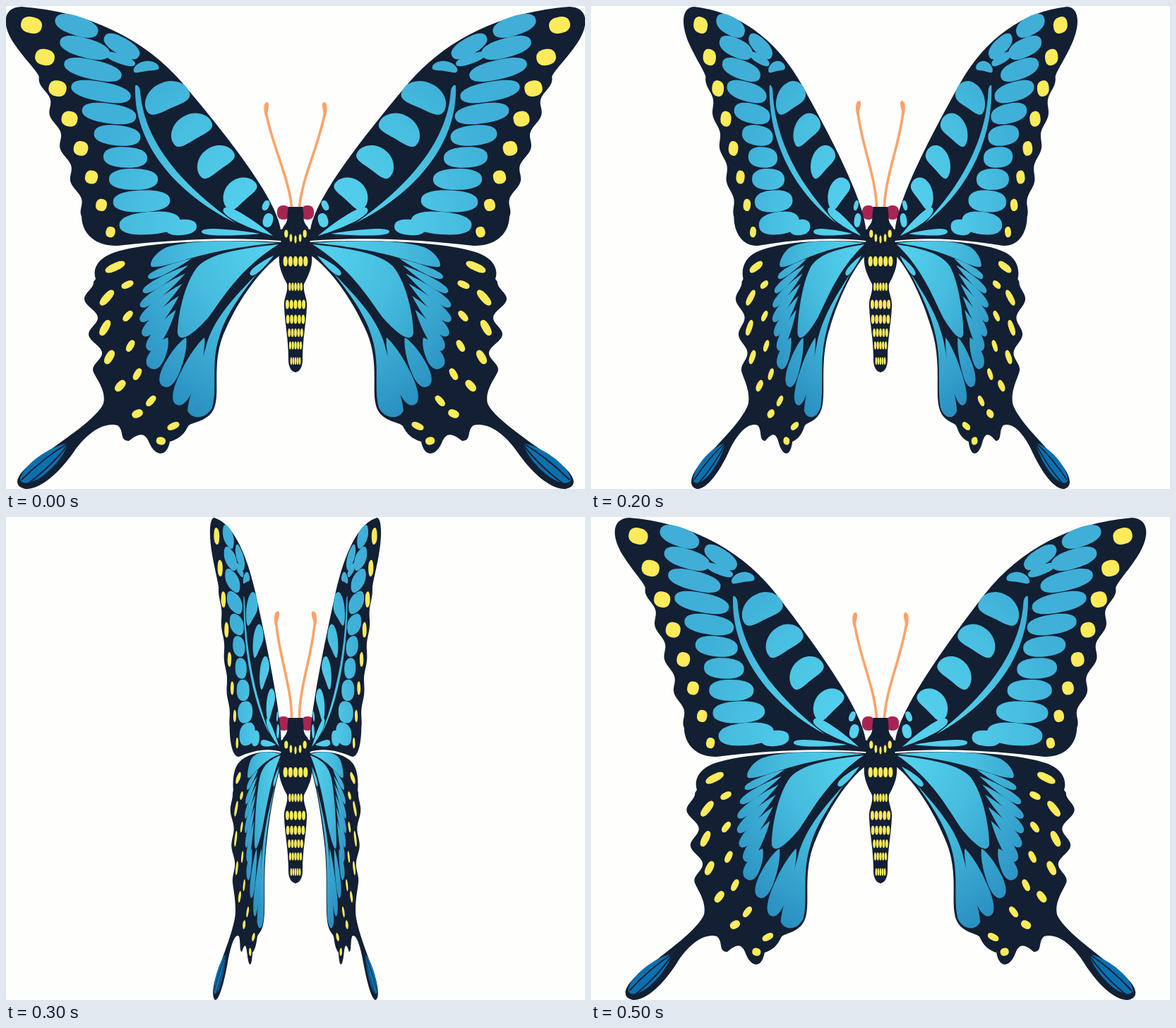
Write an HTML page that moves like this. It is 820 by 683 pixels and loops after 0.6 s.

```html
<!DOCTYPE html>
<html lang="en">
<head>
<meta charset="utf-8">
<title>Butterfly</title>
<style>
html, body { margin: 0; height: 100%; overflow: hidden; background: #fefefc; }
svg { display: block; width: 100%; height: 100%; }
.dark { fill: #131f33; }
.yellow { fill: #fdeb5b; }
</style>
</head>
<body>
<svg viewBox="0 0 820 683">
  <defs>
    <radialGradient id="foreBlue" gradientUnits="userSpaceOnUse" cx="390" cy="330" r="440">
      <stop offset="0" stop-color="#57d6f2"/>
      <stop offset=".35" stop-color="#4dc6e6"/>
      <stop offset=".65" stop-color="#3fb0d8"/>
      <stop offset="1" stop-color="#40aed7"/>
    </radialGradient>
    <radialGradient id="hindBlue" gradientUnits="userSpaceOnUse" cx="390" cy="335" r="290">
      <stop offset="0" stop-color="#56d5f0"/>
      <stop offset=".45" stop-color="#46bcde"/>
      <stop offset="1" stop-color="#268abd"/>
    </radialGradient>
  </defs>
  <g id="half">
    <g id="antenna" fill="#fba26a">
      <path d="M404.500 284C400 240 376 195 368.500 151" fill="none" stroke="#fba26a" stroke-width="3.600"/>
      <path d="M367 156C364 144 365 136 370 136C374 138 371 146 370 154Z"/>
    </g>
    <rect x="384" y="282" width="18" height="20" rx="8" fill="#a82552"/>
    <g id="wing">
      <g id="hind" fill="url(#hindBlue)"></g>
      <path d="M89 618C62 622 22 650 20 670C28 686 72 658 89 618Z" fill="#0b70ae"/>
      <path d="M90 617Q54 638 22 670M90 617Q68 648 29 677" fill="none" stroke="#131f33" stroke-width="2"/>
      <g id="fore" fill="url(#foreBlue)"></g>
      <g id="spots" class="yellow"></g>
    </g>
    <path class="dark" d="M411 284H400C397 300 401 303 393 312C387 322 391 335 388 345C384 365 390 378 398 393C400 405 393 412 394 425C395 450 400 470 400 500C400 512 405 518 411 518Z"/>
  </g>
  <use href="#half" transform="translate(820) scale(-1 1)"/>
  <g id="bands" class="yellow"></g>
</svg>
<script>
const el = id => document.getElementById(id);
const power = (v, p) => Math.sign(v) * Math.abs(v) ** p;

function path(id, d, name = "") {
  const node = document.createElementNS("http://www.w3.org/2000/svg", "path");
  node.setAttribute("d", d);
  node.setAttribute("class", name);
  el(id).append(node);
}

// Rounded cell; bend arches it, taper narrows it to a point at its start.
function cell(id, x, y, rx, ry, turn = 0, bend = 0, taper = 0) {
  const a = turn * Math.PI / 180, points = [];
  for (let i = 0; i < 48; i++) {
    const t = i * Math.PI / 24;
    const u = power(Math.cos(t), .85), v = power(Math.sin(t), .85);
    const px = rx * u, py = ry * v * ((1 + u) / 2) ** taper + bend * u * u;
    points.push([x + px * Math.cos(a) - py * Math.sin(a), y + px * Math.sin(a) + py * Math.cos(a)]);
  }
  path(id, `M${points.join("L")}Z`);
}

function leaf(id, x1, y1, x2, y2, w, taper = .6) {
  const dx = x2 - x1, dy = y2 - y1;
  cell(id, (x1 + x2) / 2, (y1 + y2) / 2, Math.hypot(dx, dy) / 2, w, Math.atan2(dy, dx) * 180 / Math.PI, 0, taper);
}

// Wavy edge running down from y0 to y1, bulging outwards first at peak.
function scallops(y0, y1, x, peak, slope, size, period) {
  let d = "";
  for (let y = y0; y <= y1; y += 3) {
    d += `L${x + slope * (y - peak) - size * Math.cos(2 * Math.PI * (y - peak) / period)} ${y}`;
  }
  return d;
}

// Forewing
path("fore", "M400 334V314L389 316C382 270 310 180 250 109C195 45 115 8 22 1C-6 2 -6 28 12 54C24 72 42 90 46 98"
  + scallops(100, 298, 66, 155, .314, 4, 47)
  + "C108 325 130 340 158 339C230 331 310 326 389 332Z", "dark");
for (let i = 0; i < 10; i++) {
  cell("fore", 100 + 11.5 * i, 28 + 31 * i, 37 + 6 * Math.cos(i - 2.7), 13.5 + .03 * i * i, 18 - 2.5 * i);
}
for (let i = 0; i < 4; i++) {
  cell("fore", 226 + 34 * i, 127 + 45 * i, 33 - 2 * i, 19 - i, -24 - 6 * i, 7);
}
path("fore", "M183 113C180 190 235 262 325 307C255 258 195 195 190 120C189 113 184 110 183 113Z");
cell("fore", 164, 57, 28, 12, 30);
cell("fore", 162, 75, 22, 6.5, 20);
cell("fore", 198, 85, 18, 7, -8, 4);
cell("fore", 248, 313, 22, 11, -5);
cell("fore", 368, 282, 7.5, 4.5, -65);
cell("fore", 371, 303, 10, 7, -75);
leaf("fore", 378, 325, 308, 287, 9);
leaf("fore", 360, 322, 277, 319, 6);

// Hindwing
path("hind", "M400 333L389 334C330 330 210 331 155 348C130 356 122 372 127 386"
  + scallops(390, 520, 119, 415, .12, 8, 50)
  + "C130 530 142 545 138 562C130 582 80 615 45 640C10 664 10 680 28 683C50 683 75 660 95 632"
  + "C115 602 140 588 158 593C168 600 160 615 174 615C186 606 196 600 203 618C212 638 228 638 232 616"
  + "C245 612 252 606 258 594C262 588 290 588 296 565C303 540 290 500 312 455C330 415 360 372 389 352L400 352Z", "dark");
path("hind", "M386 335C330 331 260 330 228 341C212 347 200 366 207 369C235 370 270 345 386 335Z");
path("hind", "M386 337C330 343 290 350 272 368C252 392 243 440 243 463C246 476 262 468 287 440C308 412 330 372 386 337Z");
path("hind", "M356 378C320 415 297 440 285 475C276 510 260 545 257 572C263 586 284 584 292 568C300 540 289 505 303 465C312 435 335 405 356 378Z");
leaf("hind", 379, 353, 346, 380, 6);
for (let i = 0; i < 6; i++) {
  leaf("hind", 263 - 4.5 * i, 357 + 8 * i + 1.3 * i * i, 190 + 1.8 * (i - 2.5) ** 2, 384 + 20.5 * i, 7 + i);
}
for (let i = 0; i < 3; i++) {
  leaf("hind", 229 + 26 * i, 469, 204 + 19 * i, 512 + 26 * i, 14 + i, .4);
}

// Yellow spots along the margins
for (let i = 0; i < 8; i++) {
  cell("spots", 36 + 19.5 * i - .5 * i * i, 27 + 46 * i - .6 * i * i, 15 - 1.2 * i, 11.5 - .08 * i * i, 12);
}
const tilt = i => 6 * (i - 2.5) ** 2 - 62;
for (let i = 0; i < 7; i++) {
  cell("spots", 140 + 4.5 * (i - 1.8) ** 2, 369 + 44 * i - .5 * i * i, 15 - 1.4 * i, 5.5, tilt(i));
}
for (let i = 0; i < 6; i++) {
  cell("spots", 172 + .52 * i ** 3, 394 + 45.5 * i - 1.1 * i * i, 9, 4.7, tilt(i));
}

// Body bands: height and half width of the body there
for (let i = -2; i <= 2; i++) cell("bands", 410 + 6.6 * i, 330 - 2 * i * i, 1.6 + .25 * i * i, 5.5);
for (const [y, half] of [[361, 21], [397, 12], [422, 17], [443, 16], [462, 13], [480, 11], [502, 9]]) {
  for (let i = -2; i <= 2; i++) cell("bands", 410 + i * half * .34, y, half * .145, 4 + half * .15);
}

const STEP = 100, start = performance.now();

function draw(now) {
  const step = Math.floor(Math.max(0, now - start) / STEP) % 6;
  const fold = 3 - Math.abs(3 - step);
  const width = 1 - .741 * (fold / 3) ** 1.945;
  el("wing").setAttribute("transform", `translate(390) scale(${width} 1) translate(-390)`);
  el("antenna").setAttribute("transform", `rotate(${2 * fold} 404.5 284)`);
  requestAnimationFrame(draw);
}
draw(start);
</script>
</body>
</html>
```
